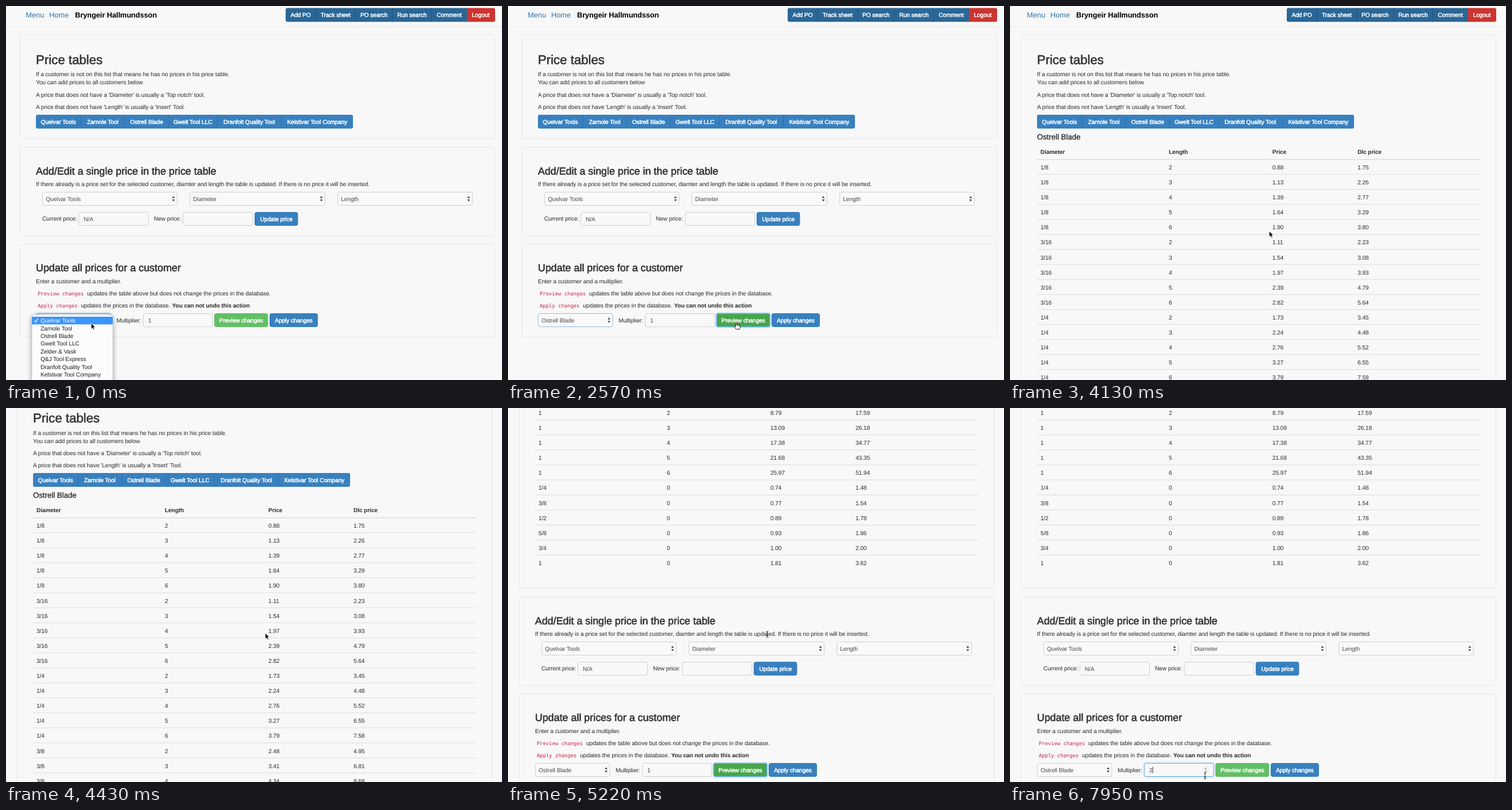
Write an HTML page that moves like this. It is 862x650 px and loops after 8 s.

```html
<!DOCTYPE html>
<html lang="en">
<head>
<meta charset="utf-8">
<title>Price tables</title>
<style>
  html, body { margin: 0; width: 100%; height: 100%; overflow: hidden; background: #f8f8f8; }
  svg { display: block; width: 862px; height: 650px; }
  text { font: 10.2px "Liberation Sans", Arial, sans-serif; letter-spacing: -.1px; fill: #2b2b2b;
         text-rendering: geometricPrecision; white-space: pre; }
  .h1 { font-size: 22.2px; } .h2 { font-size: 17.85px; } .h4 { font-size: 13.2px; }
  .h1, .h2, .h4 { letter-spacing: 0; fill: #333; stroke: #333; stroke-width: .6px; }
  .h4 { stroke-width: .4px; }
  .bold { font-weight: bold; font-size: 10.1px; }
  .user { font-weight: bold; font-size: 12.8px; fill: #000; }
  .link { font-size: 12.8px; letter-spacing: 0; fill: #2f74ad; }
  .btn { fill: #fff; stroke: #fff; stroke-width: .5px; text-anchor: middle; }
  .code { font: 8.9px "DejaVu Sans Mono", monospace; letter-spacing: 0; fill: #c7254e; }
  .field { fill: #4a4a4a; }
  .item { fill: #222; }
  .glow { filter: drop-shadow(0 0 1.5px #66afe9aa); }
</style>
</head>
<body>
<svg id="stage" viewBox="0 0 862 650"></svg>
<script>
const LOOP = 8000, ROW = 26.1, GROW = 1268.5, END = 1185.5;
const BLUE = '#3880bf', NAVY = '#2a6797', RED = '#cc3430', FOCUS = '#66afe9';
const GREEN = '#62bf65', GREEN_DARK = '#47a54a', LINE = '#dddddd', BORDER = '#cfcfcf';
const customers = ['Quelvar Tools', 'Zarnole Tool', 'Ostrell Blade', 'Gwelt Tool LLC',
  'Zelder & Vask', 'Q&J Tool Express', 'Dranfolt Quality Tool', 'Kelstivar Tool Company'];
const esc = s => String(s).replace(/&/g, '&amp;');

// y is the middle of the capitals
const SIZE = { h1: 22.2, h2: 17.85, h4: 13.2, link: 12.8, user: 12.8, code: 8.9 };
const text = (x, y, s, cls = '', id = '') =>
  `<text x="${x}" y="${y + .36 * (SIZE[cls] || 10.2)}" class="${cls}" id="${id}">${esc(s)}</text>`;
const rect = (x, y, w, h, fill, extra = '') =>
  `<rect x="${x}" y="${y}" width="${w}" height="${h}" fill="${fill}" ${extra}/>`;
const box = (x, y, w, fill, stroke, id = '') =>
  rect(x + .5, y + .5, w - 1, 23, fill, `id="${id}" rx="3" stroke="${stroke}"`);
const panel = (y, h, id = '') =>
  rect(24.5, y, 825, h, '#f8f8f8', `id="${id}" rx="3" stroke="#e5e5e5"`);
const button = (x, y, w, label, fill, id = '') =>
  box(x, y, w, fill, fill, id) + text(x + w / 2, y + 12.2, label, 'btn');
const input = (x, y, w, value, id = '') =>
  box(x, y, w, '#f8f8f8', BORDER, id) + text(x + 9, y + 12, value, 'field', id && id + 'Text');
const arrows = (x, y) =>
  `<path d="M${x - 2.4} ${y - 1.3}h4.8l-2.4 -3.4zM${x - 2.4} ${y + 1.3}h4.8l-2.4 3.4z" fill="#444"/>`;
const select = (x, y, w, value, id = '') =>
  box(x, y, w, '#f9f9f9', BORDER, id) +
  text(x + 6.3, y + 12, value, 'field', id && id + 'Text') + arrows(x + w - 7, y + 12);

// joined buttons between neighbouring edges
function group(edges, y, labels, fill, edge) {
  const left = edges[0], right = edges[labels.length];
  return rect(left, y, right - left, 24, fill, 'rx="3"') + labels.map((s, i) =>
    (i ? rect(edges[i] - .5, y, 1, 24, edge) : '') +
    text((edges[i] + edges[i + 1]) / 2, y + 12.2, s, 'btn')).join('');
}

function header() {
  return rect(-10, 35.5, 890, 1, '#e9e9e9') +
    text(34.3, 15, 'Menu', 'link') + text(75, 15, 'Home', 'link') +
    text(120, 15, 'Bryngeir Hallmundsson', 'user') +
    group([798, 850], 3.5, [''], RED) +
    group([486, 538, 607.5, 671.5, 739.5, 801], 3.5,
      ['Add PO', 'Track sheet', 'PO search', 'Run search', 'Comment'], NAVY, '#215580') +
    rect(798, 3.5, 3, 24, NAVY) + text(825, 15.7, 'Logout', 'btn');
}

function prices() {
  return panel(50, 180.5, 'listPanel') + text(52, 93, 'Price tables', 'h1') +
    text(52, 118.8, 'If a customer is not on this list that means he has no prices in his price table.') +
    text(52, 132.8, 'You can add prices to all customers below') +
    text(52, 154, "A price that does not have a 'Diameter' is usually a 'Top notch' tool.") +
    text(52, 175, "A price that does not have 'Length' is usually a 'Insert' Tool.") +
    group([52, 130, 206, 282.5, 367, 478.5, 603], 189,
      customers.filter((c, i) => i !== 4 && i !== 5), BLUE, '#2f71ac');
}

// diameter, dlc price at length 2 and at length 6, and without a length
const tools = [['1/8', 1.75, 3.8], ['3/16', 2.23, 5.64], ['1/4', 3.45, 7.58, 1.48], ['3/8', 4.95, 12.4, 1.54],
  ['1/2', 6.3, 17.3, 1.78], ['5/8', 9.2, 25, 1.86], ['3/4', 12.3, 35.7, 2], ['1', 17.59, 51.94, 3.62]];

function table() {
  const cols = [58, 281, 461, 609], rows = [];
  const add = (size, length, dlc) => rows.push([size, length, (dlc / 2).toFixed(2), dlc.toFixed(2)]);
  for (const [size, low, high] of tools)
    for (let n = 2; n <= 6; n++) add(size, n, low + (high - low) * (n - 2) / 4);
  for (const [size, , , flat] of tools) if (flat) add(size, 0, flat);

  const cells = (y, row, cls) => row.map((s, i) => text(cols[i], y, s, cls)).join('');
  return text(52, 227.3, customers[2], 'h4') +
    cells(253.5, ['Diameter', 'Length', 'Price', 'Dlc price'], 'bold') +
    rows.map((row, i) => rect(52, 266 + i * ROW, 770, i ? 1 : 1.5, LINE) +
      cells(280.3 + i * ROW, row)).join('');
}

function forms() {
  return panel(245.5, 153.5) + text(52, 286.3, 'Add/Edit a single price in the price table', 'h2') +
    text(52, 309.3, 'If there already is a price set for the selected customer, diamter and length the table is updated. If there is no price it will be inserted.') +
    select(63, 323, 235, customers[0]) + select(319, 323, 236, 'Diameter') + select(576, 323, 235, 'Length') +
    text(63, 369.3, 'Current price:') + input(126, 358, 122, 'N/A') +
    text(257, 369.3, 'New price:') + input(307.5, 358, 122, '') + button(432, 358, 75.5, 'Update price', BLUE) +
    panel(414, 161.5) + text(52, 455, 'Update all prices for a customer', 'h2') +
    text(52, 478, 'Enter a customer and a multiplier.') +
    text(55, 499.3, 'Preview changes', 'code') +
    text(141, 499.3, 'updates the table above but does not change the prices in the database.') +
    text(55, 520.3, 'Apply changes', 'code') + text(130.3, 520.3, 'updates the prices in the database.') +
    text(288.7, 520.3, 'You can not undo this action', 'bold') +
    select(52, 534, 130.5, customers[0], 'pick') + text(192, 546, 'Multiplier:') +
    input(238, 534, 121.5, '1', 'mult') +
    `<g id="spin">${rect(341.5, 540, 7, 12.5, '#f3f3f3', 'rx="3" stroke="#ddd" stroke-width=".6"')}
      <path d="M343.2 544.8l1.8 -2.4l1.8 2.4zM343.2 547.8l1.8 2.4l1.8 -2.4z" fill="#777"/></g>` +
    rect(246, 540, 7, 12, '#b3d7ff', 'id="marked" opacity=".75"') + rect(252.7, 540.5, .9, 11, '#222', 'id="caret"') +
    button(362, 534, 93.5, 'Preview changes', GREEN, 'preview') + button(458, 534, 84, 'Apply changes', BLUE);
}

function menu() {
  return rect(45, 537, 140.5, 125, '#fcfcfc', 'rx="4" stroke="#ccc" stroke-width=".6" style="filter:drop-shadow(0 2px 4px #0006)"') +
    rect(45, 540, 140.5, 13.3, '#3a94fa', 'id="hilite"') +
    '<path id="check" d="M49.3 546.6l2.3 3l4 -6.6" fill="none" stroke-width="1.4"/>' +
    customers.map((s, i) => text(60, 546.5 + i * 13.4, s, 'item', 'item' + i)).join('');
}

const pointer = `
  <g id="arrow"><path d="M0 0V10.6L2.4 8.4L4 12L5.9 11.2L4.3 7.7H7.5Z" fill="#000" stroke="#fff" stroke-width=".9"/></g>
  <g id="hand"><path d="M-1.1 1.2Q0 -.6 1 1.2V5Q2.2 4 3 5.2Q4.3 4.5 4.9 5.7Q6.6 5.2 6.7 6.8Q6.8 9.4 5.3 11.8H-.6Q-2 9.6 -4 7.5Q-3.9 5.7 -1.1 7.5Z" fill="#fff" stroke="#000" stroke-width=".9"/></g>
  <g id="beam"><path d="M-2 -3Q0 -3 0 -1.7Q0 -3 2 -3M0 -2V6.6M-1.5 3.8H1.5M-2 7.6Q0 7.6 0 6.3Q0 7.6 2 7.6" fill="none" stroke="#222"/></g>`;

document.getElementById('stage').innerHTML = rect(0, 0, 862, 650, '#f8f8f8') +
  `<g id="page">${header()}${prices()}<g id="table">${table()}</g><g id="forms">${forms()}</g></g>
   <g id="menu">${menu()}</g><g id="cursor">${pointer}</g>`;

const el = id => document.getElementById(id);
const set = (id, attrs) => { for (const k in attrs) el(id).setAttribute(k, attrs[k]); };
const show = (id, on) => set(id, { visibility: on ? 'visible' : 'hidden' });
const move = (id, x, y) => set(id, { transform: `translate(${x} ${y})` });

// strokes of the pointer: start, end, x, y reached; it rests in between
const strokes = [[240, 640, 141, 570], [1370, 1950, 380, 569], [1950, 2200, 397, 550],
  [2970, 3670, 455, 335], [3850, 4070, 450.5, 391], [5399, 5400, 415, 412], [5560, 5850, 198, 616],
  [5850, 6030, 252, 627], [6380, 6860, 238, 627], [7040, 7950, 339, 637]];

function pointerAt(t) {
  let x = 148, y = 551;
  for (const [from, to, nx, ny] of strokes) {
    const k = Math.max(0, Math.min(1, (t - from) / (to - from)));
    x += (nx - x) * k;
    y += (ny - y) * k;
  }
  return [x, y];
}

// the wheel speeds up, the page follows in jerks
const jerks = [4190, 4250, 4430, 4630, 4990, 5050, 5220];
function scrollAt(t) {
  const last = jerks.filter(j => j <= t).pop() || 4130;
  return END * ((last - 4130) / 1090) ** 2.13;
}

function focusRing(id, on, color, idle) {
  set(id, { stroke: on ? color : idle, class: on ? 'glow' : '' });
}

function draw(t) {
  const [x, y] = pointerAt(t), listed = t >= 2620, typing = t >= 6380, typed = t >= 7200;

  move('page', listed ? -5 : 0, -scrollAt(t));
  move('forms', 0, listed ? GROW : 0);
  show('table', listed);
  set('listPanel', { height: 180.5 + (listed ? GROW : 0) });

  const row = Math.max(0, Math.min(2, Math.floor((y - 540) / 13.4)));
  const lit = t < 880 || t >= 1050;
  set('menu', { opacity: Math.max(0, Math.min(1, 1 - (t - 1050) / 150)) });
  set('hilite', { y: 540 + row * 13.4, opacity: lit ? 1 : 0 });
  customers.forEach((c, i) => { el('item' + i).style.fill = lit && i === row ? '#fff' : '#222'; });
  set('check', { stroke: lit && row === 0 ? '#fff' : '#222' });

  el('pickText').textContent = customers[t < 1050 ? 0 : 2];
  focusRing('pick', t < 2510, FOCUS, t < 2620 ? '#8dbfe8' : BORDER);
  const fill = t >= 2160 && !typing ? GREEN_DARK : GREEN, pressed = t >= 2510 && !typing;
  set('preview', { fill, 'stroke-width': pressed ? 1.5 : 1 });
  focusRing('preview', pressed, FOCUS, fill);

  focusRing('mult', typing, FOCUS, BORDER);
  el('multText').textContent = typed ? 2 : 1;
  const marked = t >= 6650 && !typed;
  show('spin', typing);
  show('marked', marked);
  show('caret', typing && !marked);

  const kind = t >= 2220 && t < 2800 ? 'hand' : (t >= 5220 && t < 5400) || t >= 5980 ? 'beam' : 'arrow';
  ['arrow', 'hand', 'beam'].forEach(k => show(k, k === kind));
  move('cursor', x, y);
}

const start = performance.now();
function tick() {
  draw((performance.now() - start) % LOOP);
  requestAnimationFrame(tick);
}
tick();
</script>
</body>
</html>
```
